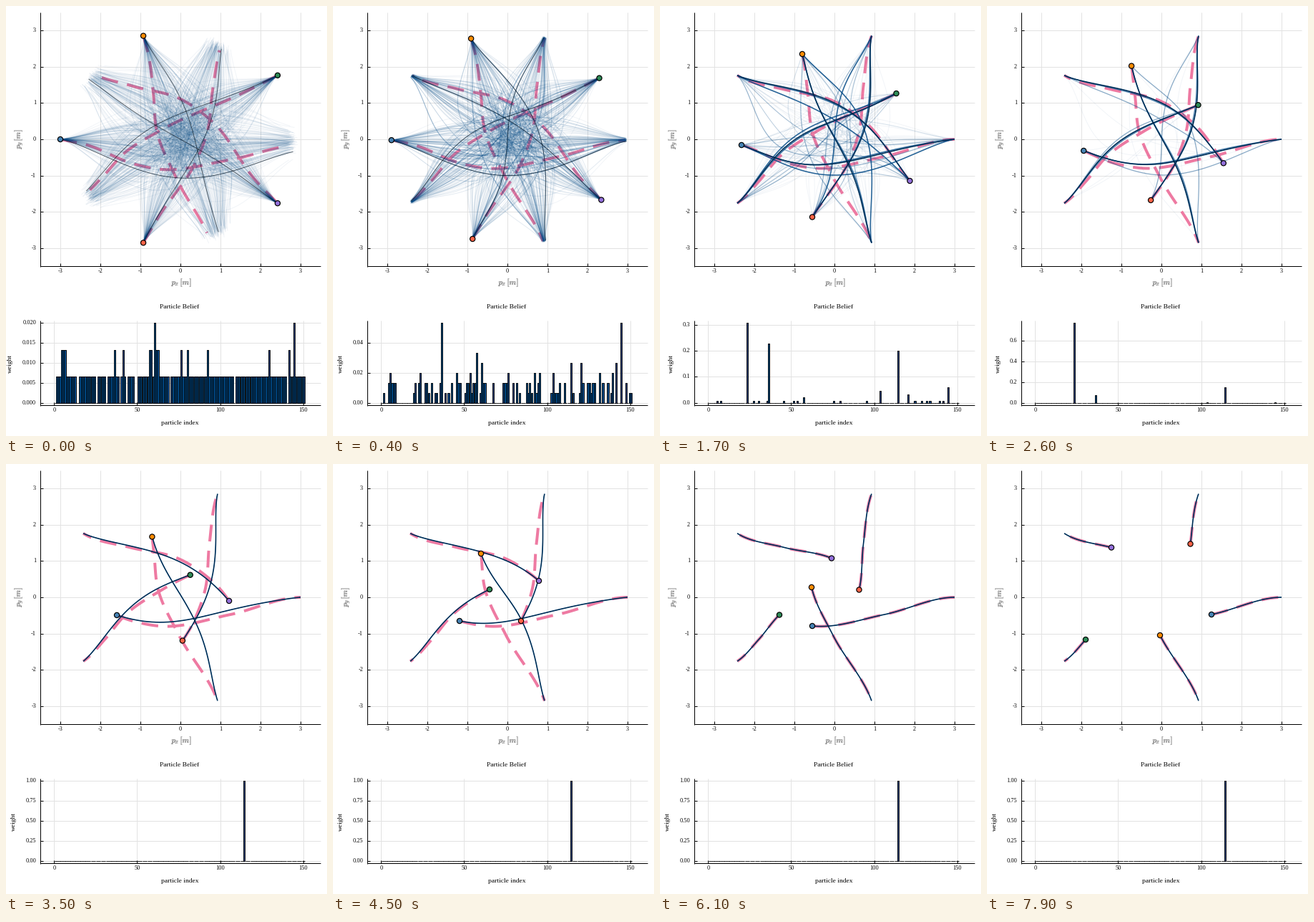
Animation of 449x600 px, one loop 8 s. Source, as a matplotlib script:

```python
import numpy as np
import matplotlib.pyplot as plt
from matplotlib.animation import FuncAnimation
from matplotlib.collections import LineCollection, PolyCollection

plt.rcParams["font.family"] = "Liberation Serif"
plt.rcParams["mathtext.fontset"] = "cm"

W, H, DPI = 449, 600, 100
FRAMES, STEP = 80, 100
PX = 72 / DPI                      # points per pixel
N = 151                            # particles
NAVY, PINK, GRID_GREY = "#004885", "#ee7aa2", "#e2e2e2"
COLORS = ["#4682b4", "#ff8c00", "#2e8b57", "#9370db", "#ff6347"]
DASH, GAP, PINK_W = 23.5, 13, 4
rng = np.random.default_rng(7)


def hermite(x, xs, ys):
    """Smooth curve through key points, coming to rest at the last one."""
    xs, ys = np.asarray(xs, float), np.asarray(ys, float)
    m = np.gradient(ys, xs)
    m[-1] = 0
    i = np.clip(np.searchsorted(xs, x, "right") - 1, 0, len(xs) - 2)
    h = xs[i + 1] - xs[i]
    s = (x - xs[i]) / h
    return ((1 + 2 * s) * (1 - s) ** 2 * ys[i] + s * (1 - s) ** 2 * h * m[i]
            + s * s * (3 - 2 * s) * ys[i + 1] + s * s * (s - 1) * h * m[i + 1])


def smooth(x):
    x = np.clip(x, 0, 1)
    return x * x * (3 - 2 * x)


def warp(t):
    """Time with a gentle start from rest."""
    return t * t / (t + 0.35)


# ---- agents: each crosses the circle along its own chord ----
CENTER = np.array([244, 186])
angle = np.pi - np.arange(5) * 2 * np.pi / 5
START = np.c_[168 * np.cos(angle), -151.8 * np.sin(angle)]
LENGTH = 2 * np.hypot(*START.T)
ALONG = -2 * START / LENGTH[:, None]
ACROSS = np.c_[-ALONG[:, 1], ALONG[:, 0]]

KEY_TIMES = warp(np.array([0, 1.7, 4.5, 6.1, 7.9]))
WAYPOINTS = np.array([
    [(114, 194), (177, 219), (213, 226), (314, 210)],
    [(199, 67), (207, 125), (212, 172), (242, 239)],
    [(330.5, 122), (219, 175), (167, 210.5), (138, 245)],
    [(349.5, 244), (288, 163), (240, 131.5), (174, 116.5)],
    [(213, 294.5), (263, 219), (278.5, 175.5), (284.5, 111.5)],
]) - CENTER
PROGRESS = [np.r_[0, 0.5 + w @ u / d] for w, u, d in zip(WAYPOINTS, ALONG, LENGTH)]


def true_dev(a, x):
    return hermite(x, np.r_[PROGRESS[a], 1], np.r_[0, WAYPOINTS[a] @ ACROSS[a], 0])


def to_px(a, x, y):
    along = (np.asarray(x) - 0.5) * LENGTH[a]
    return CENTER + along[..., None] * ALONG[a] + np.asarray(y)[..., None] * ACROSS[a]


# ---- particles: every path is a sideways bulge plus an S-shaped sway ----
bulge = rng.normal([15, -5, 10, 14, 10], 23, (N + 1, 5))
sway = rng.normal(0, 13, (N + 1, 5))
bulge[61], sway[61] = (50, -18, 31, 0, 27), (0, -5, -6, 4, -5)
bulge[37], sway[37] = (50, -44, 30, 23, 0), (0, 0, -10, 0, 14)
bulge[115], sway[115] = (33, -2, 24, 43, 33), (8, 9, -10, 0, -4)
bulge[24], sway[24] = bulge[115] + 1, sway[115] - 1
short = rng.normal(13, 4, (N + 1, 5))


def particle_dev(ids, a, x):
    hump = np.sin(np.pi * np.clip(x, 0, 1))
    return (bulge[ids, a, None] * hump ** 1.3
            + sway[ids, a, None] * np.sin(2 * np.pi * x) * hump ** 0.5)


# ---- belief: counts of 150 samples, log-linear between resampling times ----
BELIEF_T = [0, 0.8, 1.7, 2.6, 3.5]
first = rng.choice(3, N + 1, p=[0.15, 0.76, 0.09])
second = rng.choice(5, N + 1, p=[0.62, 0.2, 0.08, 0.06, 0.04]) * (first > 0)
belief = np.array([first, second, second // 3, 0 * first, 0 * first], float)
LEADERS = {24: (1, 6, 46, 115, 0), 37: (2, 17, 34, 11, 0), 58: (2, 7, 3, 0, 0),
           61: (3, 4, 0, 0, 0), 104: (1, 6, 7, 1, 0), 115: (1, 8, 30, 22, 150),
           121: (1, 8, 5, 0, 0), 145: (3, 12, 9, 1, 0)}
for i, samples in LEADERS.items():
    belief[:, i] = samples
belief[:, 0] = 0
rounding = rng.uniform(0.05, 0.95, N + 1)


def counts(t):
    if t >= BELIEF_T[-1]:
        return belief[-1]
    k = np.searchsorted(BELIEF_T, t, "right") - 1
    f = (t - BELIEF_T[k]) / (BELIEF_T[k + 1] - BELIEF_T[k])
    a, b = np.maximum(belief[k:k + 2], 0.02)
    c = a ** (1 - f) * b ** f
    c *= ((1 - f) * a.sum() + f * b.sum()) / c.sum()
    return np.floor(c + rounding) * (belief[k] + belief[k + 1] > 0)


# ---- fixed drawing ----
fig = plt.figure(figsize=(W / DPI, H / DPI), dpi=DPI, facecolor="white")
ax = fig.add_axes([0, 0, 1, 1])
ax.set(xlim=(0, W), ylim=(H, 0))
ax.axis("off")


def line(xs, ys, color="black", z=1):
    return ax.plot(xs, ys, color=color, lw=PX, zorder=z, solid_capstyle="butt")[0]


def text(x, y, s, size=8.3, ha="center", **kw):
    return ax.text(x, y, s, fontsize=size * PX, ha=ha, va="center", **kw)


def x_tick(x, top, bottom, label):
    line([x, x], [top, bottom], GRID_GREY, 0)
    line([x, x], [bottom, bottom - 4])
    text(x, bottom + 6.5, label)


def y_tick(y, label):
    return (line([48, 440], [y, y], GRID_GREY, 0), line([48, 52], [y, y]),
            text(42, y, label, ha="right"))


def spines(top, bottom):
    line([48, 48], [top, bottom + 0.5])
    line([47.5, 440], [bottom, bottom])


for v in range(-3, 4):
    x_tick(244 + 56 * v, 9, 363, str(v))
    y_tick(186 - 50.6 * v, str(v))
for v in range(0, 151, 50):
    x_tick(67.3 + 2.322 * v, 439, 557, str(v))
spines(9, 363)
spines(439, 557)
for d in (0, 1.2):
    text(244.5 + d, 386, r"$p_x\,[m]$", 11, alpha=0.45)
    text(19, 186 - d, r"$p_y\,[m]$", 11, rotation=90, alpha=0.45)
text(243, 420.5, "Particle Belief", 9.5)
text(243, 581.5, "particle index", 9.5)
weight_label = text(5, 499, "weight", 9.5, rotation=90)

# ---- moving drawing ----
truth = [ax.plot([], [], color=PINK, lw=PINK_W * PX, zorder=2, dash_capstyle="butt",
                 linestyle=(0, (DASH / PINK_W, GAP / PINK_W)))[0] for _ in range(5)]
cloud = LineCollection([], zorder=3)
best_lines = LineCollection([], colors=(0, 0, 0, 0.6), linewidths=0.8 * PX, zorder=4)
bars = PolyCollection([], facecolors=NAVY, edgecolors="black", linewidths=0.9 * PX, zorder=3)
for c in (cloud, best_lines, bars):
    ax.add_collection(c, autolim=False)
dots = ax.scatter(np.zeros(5), np.zeros(5), s=(7.2 * PX) ** 2, c=COLORS,
                  edgecolors="black", linewidths=1.2 * PX, zorder=6)
weight_ticks = [y_tick(0, "") for _ in range(6)]


def tick_step(top):
    """Smallest round step giving at most four ticks, with its decimals."""
    for e in (-3, -2, -1):
        for m in (1, 2, 2.5, 5):
            step = m * 10.0 ** e
            if top / step < 4.7:
                return step, (m == 2.5) - e


def draw_bars(n):
    base, top = 553.7, n.max() / 150
    scale = 111.3 / top
    x = 66.3 + 2.322 * np.arange(1, N + 1)
    y = base - n[1:] / 150 * scale
    bars.set_verts([[(a - 1.1, base), (a - 1.1, b), (a + 1.1, b), (a + 1.1, base)]
                    for a, b in zip(x, y)])
    step, digits = tick_step(top)
    for k, (grid, tick, label) in enumerate(weight_ticks):
        yk = base - k * step * scale
        for part in (grid, tick, label):
            part.set_visible(k * step <= top * 1.025)
        grid.set_ydata([yk, yk])
        tick.set_ydata([yk, yk])
        label.set_y(yk)
        label.set_text(f"{k * step:.{digits}f}")
    weight_label.set_x(21 - 5 * digits)


def true_path(a, x0, early):
    s = np.linspace(0, 1, 90)
    x = x0 + (1 - 18 * early / LENGTH[a] - x0) * s
    return to_px(a, x, true_dev(a, x) + 8 * early * s ** 2)


def particle_paths(a, ids, x0, y0, t, early):
    s = np.linspace(0, 1, 48)
    x = x0 + (1 - short[ids, a, None] * early / LENGTH[a] - x0) * s
    agree = smooth((t - 4.6) / 1.2)
    y = particle_dev(ids, a, x) * (1 - agree) + true_dev(a, x) * agree
    join = 1 - smooth((x - x0) / min(0.35, 1 - x0))
    fan = 0.3 * bulge[ids, a, None] * early * s ** 2
    return to_px(a, x, y + (y0 - y[:, :1]) * join + fan)


def update(i):
    t = i * STEP / 1000
    early = np.exp(-t / 0.22)          # plans still loose at first
    n = counts(t)
    ids = np.flatnonzero(n)
    best = np.argmax(n[ids])
    paths, leaders, spots = [], [], []
    for a in range(5):
        x0 = hermite(warp(t), KEY_TIMES, PROGRESS[a])
        y0 = true_dev(a, x0)
        spots.append(to_px(a, x0, y0))
        truth[a].set_data(true_path(a, x0, early).T)
        p = particle_paths(a, ids, x0, y0, t, early)
        paths.extend(p)
        leaders.append(p[best])
    alpha = np.tile(1 - 0.945 ** n[ids], 5)
    cloud.set_segments(paths)
    cloud.set_color([(0, 72 / 255, 133 / 255, v) for v in alpha])
    cloud.set_linewidth((0.95 + 0.7 * alpha) * PX)
    best_lines.set_segments(leaders)
    dots.set_offsets(spots)
    draw_bars(n)
    return []


anim = FuncAnimation(fig, update, frames=FRAMES, interval=STEP, repeat=True,
                     repeat_delay=0, blit=False)
plt.show()
```
